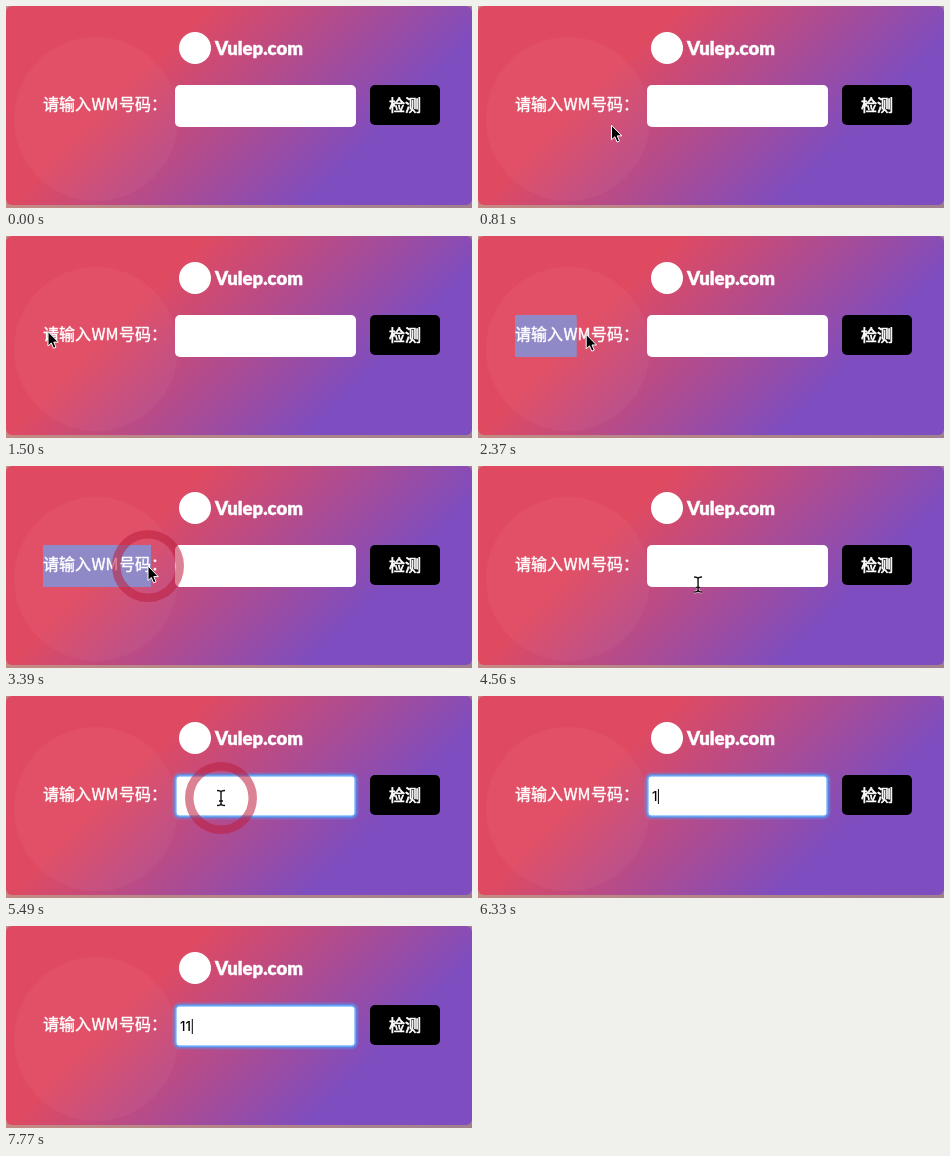
These frames come from a looping animation (466 by 202 pixels, 8 s). An HTML page:

```html
<!DOCTYPE html>
<html lang="zh-CN">
<head>
<meta charset="utf-8">
<style>
html, body { margin: 0; width: 100%; height: 100%; overflow: hidden; }
svg { display: block; width: 466px; height: 202px; }
text { font: 16px "Noto Sans CJK SC", "Noto Sans CJK", sans-serif; fill: #fff; stroke: #fff; stroke-width: .4px; }
.button { stroke-width: .7px; }
.brand { font: 900 18.5px Lato, sans-serif; }
.value { font: 500 13px Inter, sans-serif; fill: #000; stroke: none; }
</style>
</head>
<body>
<svg viewBox="0 0 466 202">
  <defs>
    <linearGradient id="card" gradientUnits="userSpaceOnUse" x2="333" y2="333">
      <stop offset=".3" stop-color="#e04a61"/>
      <stop offset=".75" stop-color="#7e4dbf"/>
    </linearGradient>
    <linearGradient id="edge">
      <stop stop-color="#c48a84"/>
      <stop offset="1" stop-color="#a0808f"/>
    </linearGradient>
    <path id="beamLine" d="M-4-7.5Q0-7.5 0-5.5Q0-7.5 4-7.5M0-5.5V5.5M-4 7.5Q0 7.5 0 5.5Q0 7.5 4 7.5M-2 3H2"/>
  </defs>
  <rect width="466" height="202" fill="url(#edge)"/>
  <rect width="466" height="199" rx="6" fill="url(#card)"/>
  <circle cx="90" cy="113" r="82" fill="#fff" opacity=".035"/>
  <circle cx="189" cy="42" r="16" fill="#fff"/>
  <text class="brand" x="209" y="49">Vulep.com</text>

  <rect id="selection" x="37" y="79" height="42" fill="#9089c8"/>
  <text x="37" y="104">请输入</text>
  <text x="99" y="104" text-anchor="middle">WM</text>
  <text x="113" y="104">号码：</text>

  <rect x="169" y="79" width="181" height="42" rx="5" fill="#fff"/>
  <g id="focus" fill="none" stroke="#4f9bf8">
    <rect x="168.5" y="78.5" width="182" height="43" rx="5" stroke-width="4" opacity=".35"/>
    <rect x="169.5" y="79.5" width="180" height="41" rx="4" stroke-width="2" opacity=".8"/>
  </g>
  <text id="value" class="value" x="174" y="105"></text>
  <rect id="caret" y="93" width="1" height="15"/>

  <rect x="364" y="79" width="70" height="40" rx="5"/>
  <text class="button" x="399" y="105" text-anchor="middle">检测</text>

  <circle id="ring" fill="none" stroke="#be1e3c" stroke-opacity=".55"/>
  <path id="arrow" d="M0 0V14.5L3.3 11.5 5.6 16.8 8 15.8 5.8 10.6H10.3Z" stroke="#fff"/>
  <g id="beam" fill="none">
    <use href="#beamLine" stroke="#fff" stroke-width="2.8" stroke-opacity=".7"/>
    <use href="#beamLine" stroke="#111" stroke-width="1.4"/>
  </g>
</svg>
<script>
const LOOP = 8000, STEP = 30, BLINK = 450, RING = 450;
const LEFT = 37, CHAR = 15.43;

// pointer moves, each easing out to its end point
const moves = [
  { from: 270, to: 990, x: 108, y: 107, power: 1.5 },
  { from: 1200, to: 1620, x: 39, y: 95, power: 2.5 },
  { from: 2190, to: 2580, x: 142, y: 100, power: 1.8 },
  { from: 3450, to: 3810, x: 242, y: 190, power: 2 },
  { from: 4380, to: 4770, x: 215, y: 102, power: 2.7 }
];
const clicks = [3030, 3990, 5130];
const focusAt = 4920, keys = [6330, 6870];

const $ = id => document.getElementById(id);
const show = (id, on) => $(id).setAttribute('visibility', on ? 'visible' : 'hidden');
const set = (id, attrs) => {
  for (const k in attrs) $(id).setAttribute(k, attrs[k]);
};
const clamp = u => Math.min(1, Math.max(0, u));

function pointer(t) {
  let x = 312, y = 205;
  for (const m of moves) {
    const e = 1 - (1 - clamp((t - m.from) / (m.to - m.from))) ** m.power;
    x += (m.x - x) * e;
    y += (m.y - y) * e;
  }
  return [x, y];
}

function drawPointer(t) {
  const [x, y] = pointer(t);
  const inField = x > 169 && x < 350 && y > 79 && y < 121;
  const place = { transform: `translate(${x} ${y})` };
  set('arrow', place);
  set('beam', place);
  show('arrow', !inField);
  show('beam', inField && t < keys[0]);

  const selecting = t >= 2190 && t < 3840;
  const chars = selecting ? Math.max(0, Math.floor((x + 4 - LEFT) / CHAR)) : 0;
  set('selection', { width: chars * CHAR });
}

function drawRing(t) {
  const start = clicks.find(s => t >= s && t < s + RING);
  show('ring', start);
  if (!start) return;
  const r = (t - start) * .1, w = Math.min(8.5, r), [cx, cy] = pointer(start);
  set('ring', { cx, cy, r: r - w / 2, 'stroke-width': w });
}

function drawField(t) {
  const typed = keys.filter(k => k <= t).length;
  const since = t - (typed ? keys[typed - 1] : focusAt + STEP);
  $('value').textContent = '1'.repeat(typed);
  set('caret', { x: 174 + typed * 5.9 });
  show('caret', since >= 0 && Math.floor(since / BLINK) % 2 === 0);
  show('focus', t >= focusAt);
}

function draw(now) {
  const t = Math.floor(now % LOOP / STEP) * STEP;
  drawPointer(t);
  drawRing(t);
  drawField(t);
  requestAnimationFrame(draw);
}
draw(0);
</script>
</body>
</html>
```
